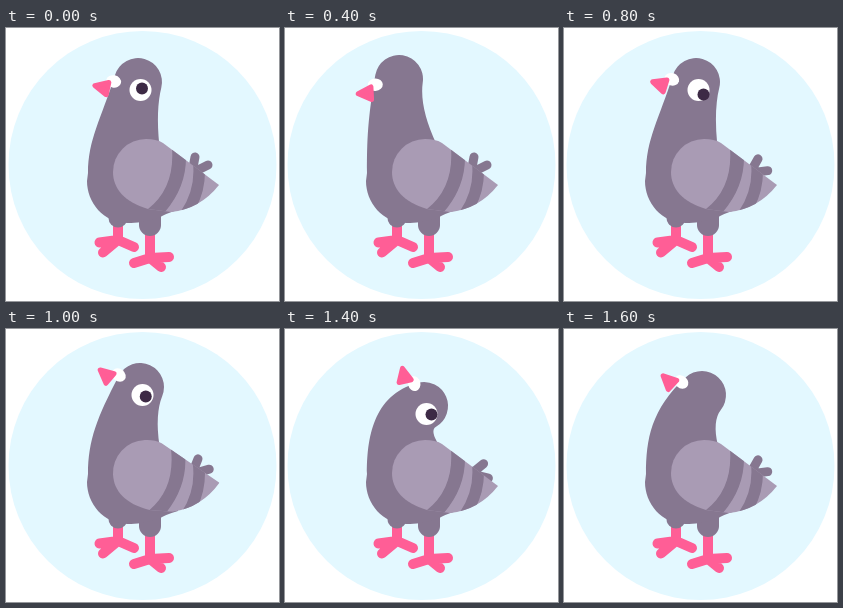
Write an HTML page that moves like this. It is 273 by 273 pixels and loops after 1700 ms.

```html
<!DOCTYPE html>
<html lang="en">
<head>
<meta charset="utf-8">
<title>Pigeon</title>
<style>
  html, body { margin: 0; height: 100%; overflow: hidden; background: #fff; }
  svg { display: block; width: 100%; height: 100%; }
  .plum { fill: #867790; }
  .lilac { fill: #a99bb4; }
  .line { fill: none; stroke: #867790; stroke-linecap: round; stroke-linejoin: round; }
  .pink { stroke: #ff5e96; }
</style>
</head>
<body>
<svg viewBox="0 0 273 273">
  <clipPath id="feathers">
    <path d="M142 181C118 174 107 160 107 144A33 33 0 0 1 140 111C147 111 152 112 157 115L213 157Q194 181 165 184Z"/>
  </clipPath>
  <circle cx="136.5" cy="137" r="134" fill="#e3f8ff"/>
  <path class="line pink" stroke-width="10"
    d="M112 190V212L93.5 214.5M112 212L97 224.5M112 212L128 219M144 200V230L128 235M144 230L155 239M144 230L163 229"/>
  <path class="line" stroke-width="19" d="M112 180V190"/>
  <path class="line" stroke-width="22" d="M144 180V197"/>
  <path id="tail" class="line" stroke-width="9" d="M189 129L186 145L202 137"/>
  <path id="body" class="plum"/>
  <g id="wing"><g clip-path="url(#feathers)">
    <path class="lilac" d="M100 105H220V190H100Z"/>
    <path class="plum" d="M166 120L180 130Q180 160 158 185L142 181Q169 160 166 120Z"/>
    <path class="plum" d="M187 135L199 144Q199 163 190 180L173 186Q190 163 187 135Z"/>
  </g></g>
  <g id="beak">
    <ellipse cx="5.5" cy="-8" rx="7.5" ry="6.2" fill="#fff"/>
    <path class="line pink" style="fill:#ff5e96" stroke-width="5" d="M-12 0L1-6V6.5Z"/>
  </g>
  <g id="eye">
    <circle r="11" fill="#fff"/>
    <circle id="pupil" r="6" fill="#3d2a45"/>
  </g>
</svg>
<script>
const LOOP = 1700, STEP = 100;
const HEAD = 24, BEAK = 32, BEAK_PITCH = 23;
const part = id => document.getElementById(id);

// Head centre and tilt, gaze of the pupil, eye open, tail and wing angles.
const rest = { x: 132, y: 54, tilt: -11, gazeX: 1.5, gazeY: -1.5, open: 1, tail: 0, wing: 0 };
const forward = { ...rest, x: 114, y: 51, tilt: -26, open: 0 };
const reach = { ...forward, x: 105, y: 48 };
const glance = { ...rest, gazeX: -2.5, gazeY: -3.5 };
const aside = { ...rest, tilt: -6, gazeX: 5, gazeY: 4.5, tail: 19 };
const stretch = { ...aside, y: 45 };
const up = { ...rest, x: 136, y: 62, tilt: 40, tail: 3, wing: -5 };
const bob = { ...up, y: 64, tilt: 50, tail: 20 };
const back = { ...rest, x: 139, y: 77, tilt: 54, gazeX: 5, gazeY: .5, tail: 40 };
const turned = { ...rest, x: 138, y: 66, tilt: 20, open: 0, tail: 19 };

const keys = [
  [0, rest], [100, rest], [300, reach], [400, forward], [600, glance], [700, stretch],
  [800, aside], [1200, up], [1300, bob], [1400, back], [1600, turned], [LOOP, rest]
];

function poseAt(t) {
  const i = keys.findIndex(([at]) => at > t);
  const [t0, a] = keys[i - 1], [t1, b] = keys[i];
  const k = (t - t0) / (t1 - t0);
  return Object.fromEntries(Object.keys(a).map(p => [p, a[p] + (b[p] - a[p]) * k]));
}

const polar = (x, y, r, deg) =>
  [x + r * Math.cos(deg * Math.PI / 180), y + r * Math.sin(deg * Math.PI / 180)];
const distance = (a, b) => Math.hypot(a[0] - b[0], a[1] - b[1]);

// The lower the head, the more the neck bends back.
function bodyPath(x, y) {
  const lean = Math.max(2, (y - 47) * 2.5);
  const chest = [82, 145], nape = [140 + x / 10, 116];
  const front = polar(x, y, HEAD, 180 + lean);
  const rear = polar(x, y, HEAD, lean * .8);
  const rise = distance(chest, front);
  const throat = polar(...front, rise * .45, 90 + lean);
  const hollow = polar(...rear, distance(rear, nape) * .4, 90 + lean * .8);
  return `M${chest}C${chest[0]} ${chest[1] - rise * .33} ${throat} ${front}` +
    `A${HEAD} ${HEAD} 0 0 1 ${rear}Q${hollow} ${nape}` +
    'L165 125L172 182Q158 186 153 190C140 194 130 195 122 195C97 195 81 174 81 153Z';
}

function place(id, transform) {
  part(id).setAttribute('transform', transform);
}

function draw({ x, y, tilt, gazeX, gazeY, open, tail, wing }) {
  part('body').setAttribute('d', bodyPath(x, y));
  place('beak', `translate(${polar(x, y, BEAK, 180 + tilt)}) rotate(${tilt + BEAK_PITCH})`);
  place('eye', `translate(${x + 2.5} ${y + 8})`);
  part('eye').style.display = open < .5 ? 'none' : '';
  place('pupil', `translate(${gazeX} ${gazeY})`);
  place('tail', `rotate(${tail} 186 145)`);
  place('wing', `rotate(${wing} 140 145)`);
}

function tick() {
  const t = performance.now() % LOOP;
  draw(poseAt(Math.floor(t / STEP) * STEP));
  requestAnimationFrame(tick);
}
tick();
</script>
</body>
</html>
```
